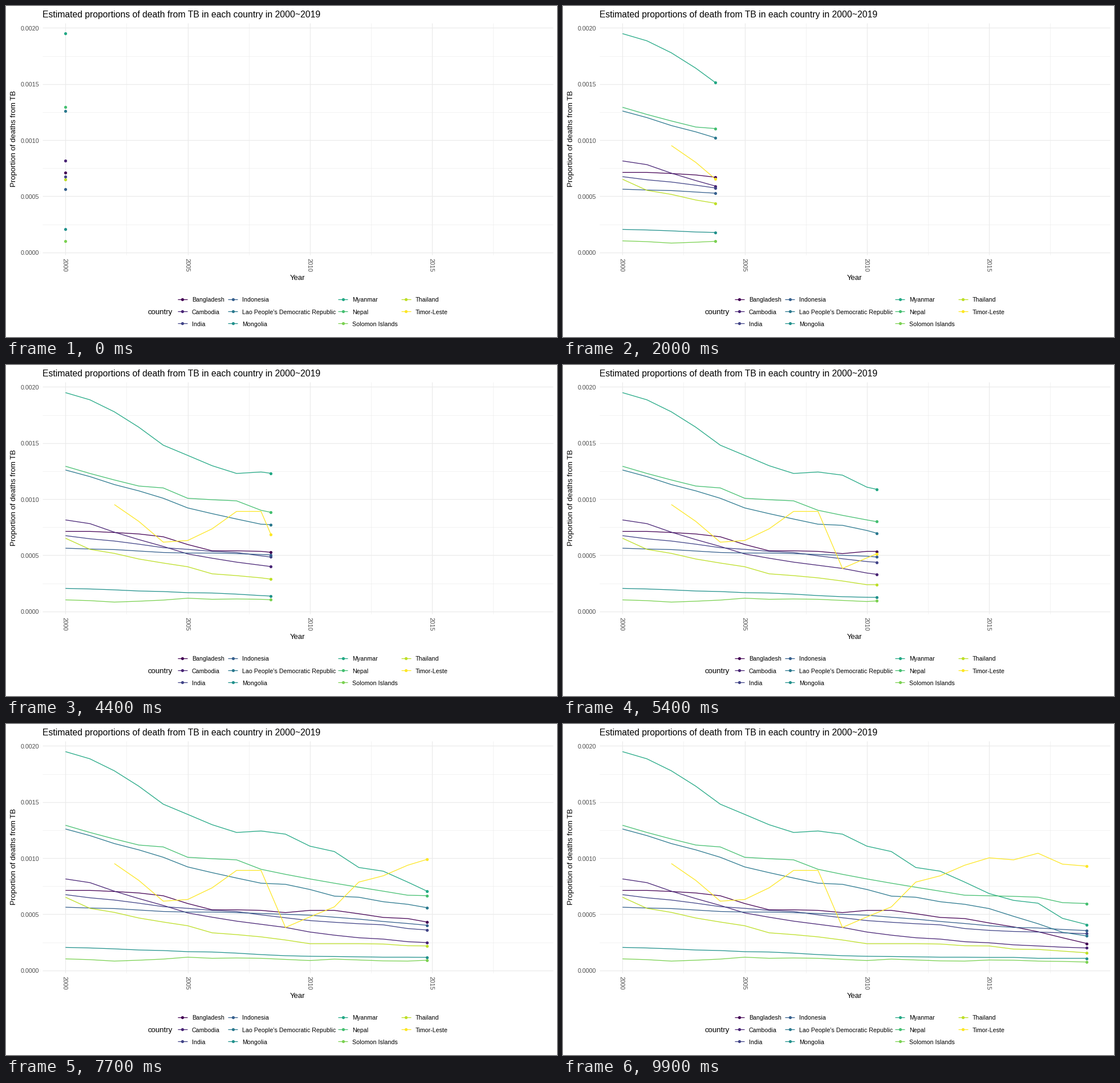
Animation of 966 by 580 pixels, one loop 10 s. Source, as a matplotlib script:

```python
import numpy as np
import matplotlib.pyplot as plt
from matplotlib.animation import FuncAnimation

W, H, DPI = 966, 580, 100
FRAMES = 100
LEFT, RIGHT, TOP, BOTTOM = 63.5, 958.6, 30, 435.5
PT = 72 / DPI  # points per pixel
LINE = 1.28 * PT
DOT = 5.2 * PT
GREY = "#4d4d4d"

plt.rcParams["font.family"] = "Liberation Sans"
fig = plt.figure(figsize=(W / DPI, H / DPI), dpi=DPI, facecolor="white")
ax = fig.add_axes([0, 0, 1, 1])
ax.set_xlim(0, W)
ax.set_ylim(H, 0)
ax.axis("off")


def year_x(year):
    return 104.3 + (year - 2000) * 42.85


def rate_y(rate):
    """Rate is in deaths per million."""
    return 431.8 - rate * 0.1967


def label(x, y, text, size, color="black", **kw):
    kw = {"ha": "left", "va": "baseline", "rotation_mode": "anchor", **kw}
    ax.text(x, y, text, size=size * PT, color=color, **kw)


def draw_grid():
    for i in range(8):
        width = (0.64 if i % 2 else 1.28) * PT
        x = year_x(2000 + 2.5 * i)
        ax.plot([x, x], [TOP, BOTTOM], color="#ebebeb", lw=width,
                solid_capstyle="butt", zorder=1 - i % 2)
    for i in range(9):
        width = (0.64 if i % 2 else 1.28) * PT
        y = rate_y(250 * i)
        ax.plot([LEFT, RIGHT], [y, y], color="#ebebeb", lw=width,
                solid_capstyle="butt", zorder=1 - i % 2)


def draw_labels():
    label(63.5, 20, "Estimated proportions of death from TB in each country "
          "in 2000~2019", 15.7)
    for rate in range(0, 2001, 500):
        label(58, rate_y(rate) + 4.5, f"{rate / 1e6:.4f}", 10.7, GREY, ha="right")
    for year in range(2000, 2016, 5):
        label(year_x(year) - 4.6, 441.8, str(year), 10.7, GREY, rotation=270)
    label(511, 480.5, "Year", 13.2, ha="center")
    label(17.5, 232.8, "Proportion of deaths from TB", 13.2,
          ha="center", rotation=90)


countries = []


def country(name, *rates, start=2000):
    years = np.arange(start, start + len(rates))
    countries.append((name, years, np.array(rates)))


country("Bangladesh", 713, 713, 703, 690, 665, 596, 540, 540, 535, 515,
        535, 535, 505, 472, 462, 423, 388, 345, 291, 240)
country("Cambodia", 815, 782, 706, 640, 579, 512, 474, 439, 411, 383,
        342, 314, 291, 279, 256, 246, 228, 218, 207, 200)
country("India", 675, 647, 627, 599, 568, 553, 535, 525, 495, 469,
        444, 429, 416, 406, 373, 357, 347, 342, 335, 327)
country("Indonesia", 563, 556, 551, 538, 525, 520, 520, 515, 507, 500,
        492, 474, 457, 436, 418, 398, 383, 378, 365, 355)
country("Lao People's Democratic Republic",
        1260, 1201, 1130, 1074, 1008, 922, 871, 823, 777, 767,
        721, 662, 652, 612, 589, 551, 482, 416, 340, 307)
country("Mongolia", 205, 200, 192, 182, 177, 167, 164, 154, 141, 131,
        126, 124, 121, 118, 118, 116, 116, 108, 108, 108)
country("Myanmar", 1949, 1885, 1778, 1641, 1481, 1390, 1298, 1229, 1242, 1214,
        1107, 1059, 917, 884, 787, 685, 624, 599, 464, 408)
country("Nepal", 1293, 1229, 1171, 1117, 1100, 1008, 995, 985, 901, 856,
        815, 777, 741, 706, 670, 665, 660, 652, 604, 596)
country("Solomon Islands", 103, 96, 83, 91, 101, 118, 108, 111, 108, 98,
        88, 101, 93, 85, 83, 93, 91, 83, 80, 75)
country("Thailand", 652, 553, 517, 467, 431, 398, 335, 319, 299, 271,
        238, 238, 238, 235, 220, 218, 190, 187, 172, 157)
country("Timor-Leste", 952, 802, 617, 632, 736, 891, 891, 383, 477,
        566, 787, 843, 937, 1003, 985, 1044, 947, 929, start=2002)

colors = plt.get_cmap("viridis")(np.linspace(0, 1, len(countries)))


def draw_legend():
    label(248.7, 540, "country", 13.2)
    columns = (309.3, 397.6, 590.8, 701)
    for i, (name, _, _) in enumerate(countries):
        x, y = columns[i // 3], 514.2 + 21.1 * (i % 3)
        ax.plot([x - 8.5, x + 8.5], [y, y], color=colors[i], lw=LINE,
                solid_capstyle="butt")
        ax.plot([x], [y], "o", color=colors[i], ms=DOT, mew=0)
        label(x + 16.6, y + 4.2, name, 10.6)


draw_grid()
draw_labels()
draw_legend()
lines = [ax.plot([], [], color=c, lw=LINE, solid_capstyle="butt", zorder=3)[0]
         for c in colors]
dots = [ax.plot([], [], "o", color=c, ms=DOT, mew=0, zorder=4)[0]
        for c in colors]

# Each year lands on a whole frame, with steady motion in between.
year_frames = np.round(np.arange(20) * (FRAMES - 1) / 19)


def update(frame):
    now = np.interp(frame, year_frames, 2000 + np.arange(20))
    for (_, years, rates), line, dot in zip(countries, lines, dots):
        if now < years[0]:
            line.set_data([], [])
            dot.set_data([], [])
            continue
        past = years < now
        xs = year_x(np.append(years[past], now))
        ys = rate_y(np.append(rates[past], np.interp(now, years, rates)))
        line.set_data(xs, ys)
        dot.set_data(xs[-1:], ys[-1:])
    return lines + dots


anim = FuncAnimation(fig, update, frames=FRAMES, interval=100,
                     init_func=lambda: update(0), repeat=True, repeat_delay=0)
plt.show()
```
